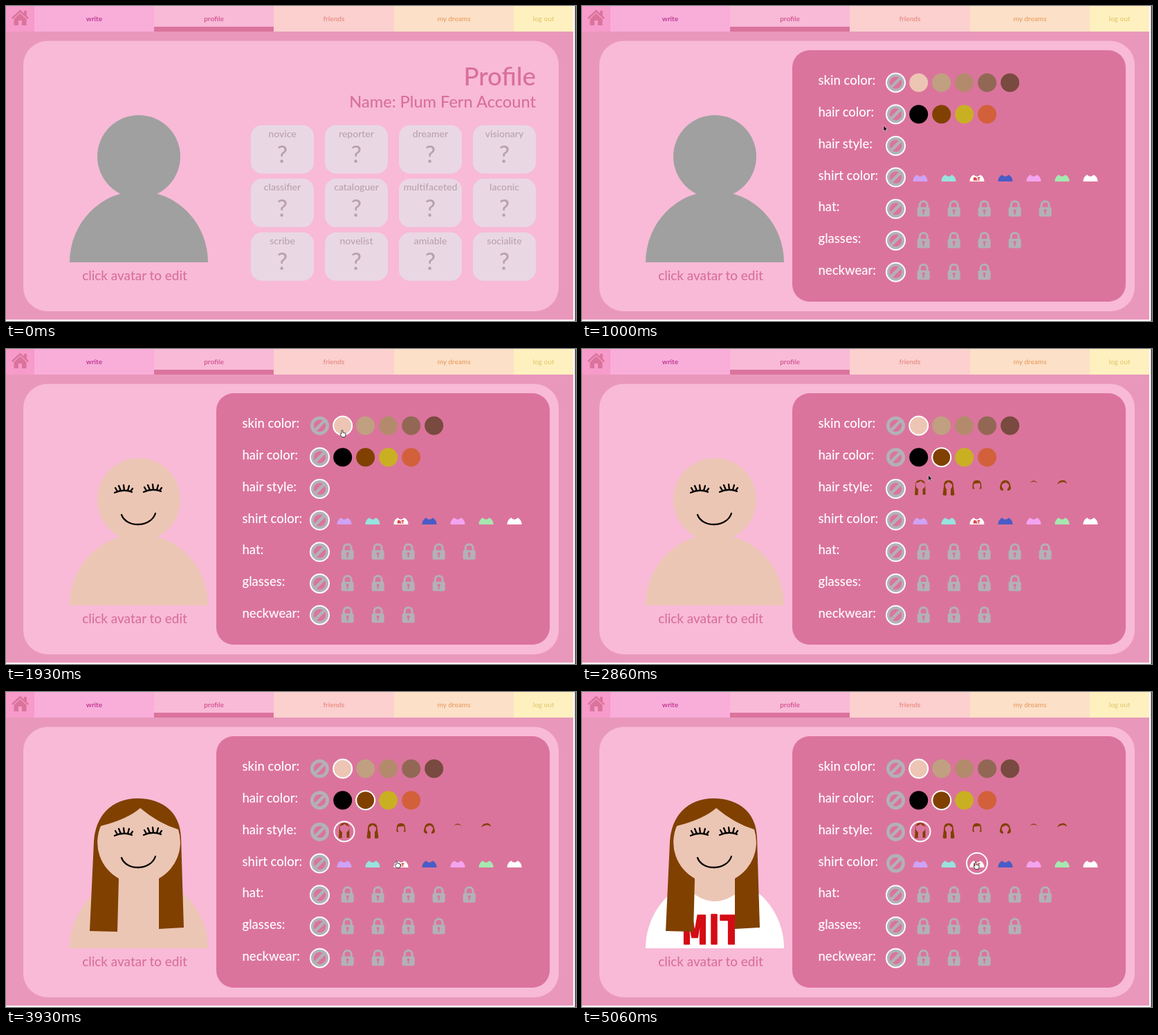
Recreate the animation shown at these times as an HTML page. Size 824 by 456 pixels, loop 5.13 s.

```html
<!DOCTYPE html>
<html lang="en">
<head>
<meta charset="utf-8">
<title>Avatar editor</title>
<style>
  html, body { margin: 0; width: 100%; height: 100%; overflow: hidden; background: #fff; }
  svg { display: block; width: 824px; height: 456px; }
  text { font-family: Lato, "Open Sans", sans-serif; font-weight: 500; }
  .nav { font-size: 10.1px; font-weight: 600; text-anchor: middle; }
  .rose { fill: #d9709a; }
  .badge { font-size: 14px; fill: #b9a1ac; text-anchor: middle; }
  .mark { font-size: 34px; fill: #b9a1ac; text-anchor: middle; }
  .label { font-size: 18.5px; fill: #fff; }
  .shirt text { font-size: 59px; font-weight: 700; fill: #d40c14; stroke: #d40c14; stroke-width: 1.5; stroke-linejoin: round; text-anchor: middle; }
  .shirt .mono { font-family: "Noto Sans Mono", monospace; }
  .line { fill: none; stroke: #000; stroke-width: 2.3; stroke-linecap: round; }
  .ring { fill: none; stroke: #fff; stroke-width: 2; }
</style>
</head>
<body>
<svg id="stage" viewBox="0 0 824 456"></svg>
<script>
const LOOP = 5130, STEP = 1000 / 15;
const ROSE = '#db749c', CARD = '#f8bad7', GREY = '#b2b2b6', BROWN = '#804000';

const rect = (x, y, w, h, fill, r = 0) =>
  `<rect x="${x}" y="${y}" width="${w}" height="${h}" rx="${r}" fill="${fill}"/>`;
const disc = (x, y, r, fill) => `<circle cx="${x}" cy="${y}" r="${r}" fill="${fill}"/>`;
const text = (x, y, cls, s, more = '') => `<text x="${x}" y="${y}" class="${cls}" ${more}>${s}</text>`;
const path = (d, fill) => `<path d="${d}" fill="${fill}"/>`;
const group = (id, body) => `<g id="${id}">${body}</g>`;
const at = (x, y, body, k = 1) => `<g transform="translate(${x} ${y}) scale(${k})">${body}</g>`;

// Avatar parts
const BODY = 'M92 371A100 103 0 0 1 292 371Z';
const SHIRT = 'M92 371A100 103 0 0 1 147 279Q192 327 237 279A100 103 0 0 1 292 371Z';
const HAIR = 'M190 154C152 154 129 180 127 217L121 346L161 347L163 270A60 60 0 0 1 137 194' +
  'Q176 184 194 168Q220 190 249 199A60 60 0 0 1 221 270L221 343L257 341L253 210C252 176 228 154 190 154Z';

const lettering = text(163, 365, 'mono', 'M') + text(191, 365, '', 'I') + text(216, 365, 'mono', 'T');
const shirt = (fill, printed) => `<g class="shirt">${path(SHIRT, fill)}${printed ? lettering : ''}</g>`;

const eye = '<path class="line" d="M-13 4Q0 -2 12 3M-9 2L-12 -3M-4 1L-7 -6M1 .5L0 -7M6 1L8 -6M10 2L13 -2"/>';
const face = at(170, 204, eye) + at(212, 203, eye) +
  '<path class="line" d="M167 240C174 259 209 259 216 238"/>';

function nav() {
  const tabs = [
    [0, 41, '#f79bcb'],
    [41, 173, '#f9aeda', 'write', '#b9308f'],
    [214, 173, CARD, 'profile', '#d4508f'],
    [387, 174, '#fbd0cf', 'friends', '#e88b82'],
    [561, 173, '#fce0c8', 'my dreams', '#e8a268'],
    [734, 86, '#fff0c0', 'log out', '#e2cc72']
  ];
  const home = path('M20.5 5.5L33 17L31.3 19L20.5 9L9.7 19L8 17L15 10.6ZM26 7H30V14L26 10.4Z', ROSE) +
    path('M20.5 10.6L29.5 19V28H23V21H18V28H11.5V19Z', ROSE);
  return tabs.map(([x, w, fill, name, ink]) => rect(x, 0, w, 37, fill) +
    (name ? text(x + w / 2, 21.5, 'nav', name, `fill="${ink}"`) : '')).join('') +
    rect(214, 30, 173, 7, ROSE) + home;
}

function badges() {
  const names = ['novice', 'reporter', 'dreamer', 'visionary', 'classifier', 'cataloguer',
    'multifaceted', 'laconic', 'scribe', 'novelist', 'amiable', 'socialite'];
  return names.map((name, i) => at(354 + 107 * (i % 4), 172.5 + 77.6 * Math.floor(i / 4),
    rect(0, 0, 91, 70, '#e9d8e4', 16) + text(45.5, 17, 'badge', name) + text(45.5, 54.5, 'mark', '?'))).join('');
}

const rowY = r => 111 + 45.7 * r;
const ring = (row, col, x, y, r) =>
  `<circle class="ring" data-row="${row}" data-col="${col}" cx="${x}" cy="${y}" r="${r}"/>`;

const none = row => at(453.5, rowY(row), disc(0, 0, 13.5, GREY) + disc(0, 0, 8.7, ROSE) +
  `<path d="M-6.5 6.5L6.5 -6.5" stroke="${GREY}" stroke-width="4.5"/>`) + ring(row, 0, 453.5, rowY(row), 13.5);

const swatches = (row, fills) => fills.map((fill, i) => {
  const x = 486.7 + 33 * i;
  return disc(x, rowY(row), 13.5, fill) + ring(row, i + 1, x, rowY(row), 13.5);
}).join('');

const lock = (x, y) => at(x, y,
  `<path d="M-5.5 0V-5A5.5 5.5 0 0 1 5.5 -5V0" fill="none" stroke="${GREY}" stroke-width="3"/>` +
  rect(-9, -2, 18, 13.5, GREY, 2) + disc(0, 3, 2.1, ROSE) + rect(-1, 3, 2, 5.5, ROSE));
const locks = (row, n) =>
  Array.from({ length: n }, (_, i) => lock(493.7 + 44 * i, rowY(row) - .5)).join('');

function styles() {
  const cuts = [
    'M0 0C-6 0 -7 4 -7 9L-8.5 21Q-6 23 -3 21.5L-3 13Q-6 9 -5 6L0 2.5L5 6Q6 9 3 13L3 21.5Q6 23 8.5 21L7 9C7 4 6 0 0 0Z',
    'M0 0C-6 0 -6.5 4 -6.5 12L-3.5 13Q-6 8 -4 5L4 4Q6 8 3.5 13L6.5 12C6.5 4 6 0 0 0Z',
    'M0 0C-6 0 -7 5 -8 11Q-8 15 -3 15L-3 13Q-7 8 -4 5L1 3L5 6Q6 9 3 13L3 15Q8 15 8 11C7 5 6 0 0 0Z',
    'M-6 4Q0 -3 6 4Q0 0 -6 4Z',
    'M-7 6Q-5 0 1 0Q6 0 7 5Q4 2 1 2.5Q-4 3 -7 6Z'
  ];
  return at(489 - 190 * .114, 189.5 - 154 * .114, path(HAIR, BROWN), .114) +
    cuts.map((d, i) => at(530 + 41 * i, 190, path(d, BROWN))).join('') + ring(2, 1, 489, 202, 14.5);
}

function shirts() {
  const fills = ['#d0a2f5', '#97e3df', '#fff', '#4a5cc6', '#f4a4f0', '#a5e8b0', '#fff'];
  return fills.map((fill, i) =>
    at(489 + 41 * i - 192 * .105, 254 - 371 * .105, shirt(fill, i === 2), .105)).join('') +
    ring(3, 3, 571, 248, 15);
}

function panel() {
  const labels = ['skin color:', 'hair color:', 'hair style:', 'shirt color:', 'hat:', 'glasses:', 'neckwear:'];
  return rect(304, 64, 482, 364, ROSE, 25) +
    labels.map((s, r) => text(341.5, rowY(r) + 3.4, 'label', s) + none(r)).join('') +
    swatches(0, ['#edc5b4', '#c0a080', '#b48a6d', '#926855', '#794a40']) +
    swatches(1, ['#000', BROWN, '#c9b022', '#d2603a']) +
    group('styles', styles()) + shirts() + locks(4, 5) + locks(5, 4) + locks(6, 3);
}

const stage = document.getElementById('stage');
stage.innerHTML =
  rect(0, 0, 820, 454, '#e998bb') + rect(822.6, 0, 1.4, 456, '#3a3236') + nav() +
  rect(25, 50.5, 774, 391.5, CARD, 35) +
  group('skin', path(BODY, 'inherit') + disc(192, 218, 60, 'inherit')) +
  group('face', face) + group('shirt', shirt('#fff', true)) + group('hair', path(HAIR, BROWN)) +
  text(186, 397, 'rose', 'click avatar to edit', 'font-size="18.9" text-anchor="middle"') +
  group('summary',
    text(766, 115, 'rose', 'Profile', 'font-size="36.7" text-anchor="end"') +
    text(766, 147, 'rose', 'Name: Plum Fern Account', 'font-size="23.6" text-anchor="end"') + badges()) +
  group('panel', panel()) +
  '<circle id="tap" cx="197" cy="285" r="15.2" fill="none" stroke="#d8434b" stroke-width="1.8"/>' +
  group('cursor',
    '<path id="arrow" d="M0 -4V4L1.8 2.4L3 5L4.2 4.4L3 2H5.4Z" fill="#000" stroke="#fff" stroke-width=".5"/>' +
    '<path id="hand" d="M-2 -4Q-1 -5.5 0 -4V-1L4 0Q4.5 3 3 5.5H-1.5L-4 1.5Q-3.5 0 -2 1Z" fill="#fff" stroke="#333" stroke-width=".9"/>');

const el = id => document.getElementById(id);
const show = (id, on) => el(id).setAttribute('display', on ? 'inline' : 'none');
const rings = [...stage.querySelectorAll('.ring')];

// Time and chosen column for each row
const OPEN = 190;
const picks = [[1530, 1], [2460, 2], [3330, 1], [4330, 3]];
const hover = [[1200, 2060], [2200, 2720], [3000, 3530], [3860, LOOP]];
const track = [
  [330, 197, 285], [1000, 436, 177], [1330, 487, 122], [1990, 487, 122],
  [2330, 520, 158], [2660, 520, 158], [2860, 501, 186], [3130, 489, 203],
  [3470, 489, 203], [3930, 566, 249], [4130, 570, 251], [LOOP, 570, 251]
];

function place(t) {
  const i = Math.max(1, track.findIndex(p => p[0] >= t));
  const [t0, x0, y0] = track[i - 1], [t1, x1, y1] = track[i];
  const k = Math.max(0, (t - t0) / (t1 - t0));
  return [x0 + (x1 - x0) * k, y0 + (y1 - y0) * k];
}

function draw(t) {
  const open = t >= OPEN;
  const done = picks.map(p => t >= p[0]);
  show('summary', !open);
  show('panel', open);
  show('tap', t >= 130 && t < 330);
  el('skin').setAttribute('fill', done[0] ? '#ecc6b4' : '#a0a0a0');
  show('face', done[0]);
  show('styles', done[1]);
  show('hair', done[2]);
  show('shirt', done[3]);
  for (const r of rings) {
    const row = +r.dataset.row;
    const chosen = done[row] ? picks[row][1] : 0;
    r.style.visibility = chosen === +r.dataset.col ? 'inherit' : 'hidden';
  }
  const over = hover.some(([a, b]) => t >= a && t < b);
  show('cursor', t >= 330);
  show('hand', over);
  show('arrow', !over);
  el('cursor').setAttribute('transform', `translate(${place(t)})`);
}

const start = performance.now();
function tick() {
  const t = Math.max(0, performance.now() - start) % LOOP;
  draw(Math.min(LOOP, Math.floor((t + 7) / STEP) * STEP));
  requestAnimationFrame(tick);
}
tick();
</script>
</body>
</html>
```
